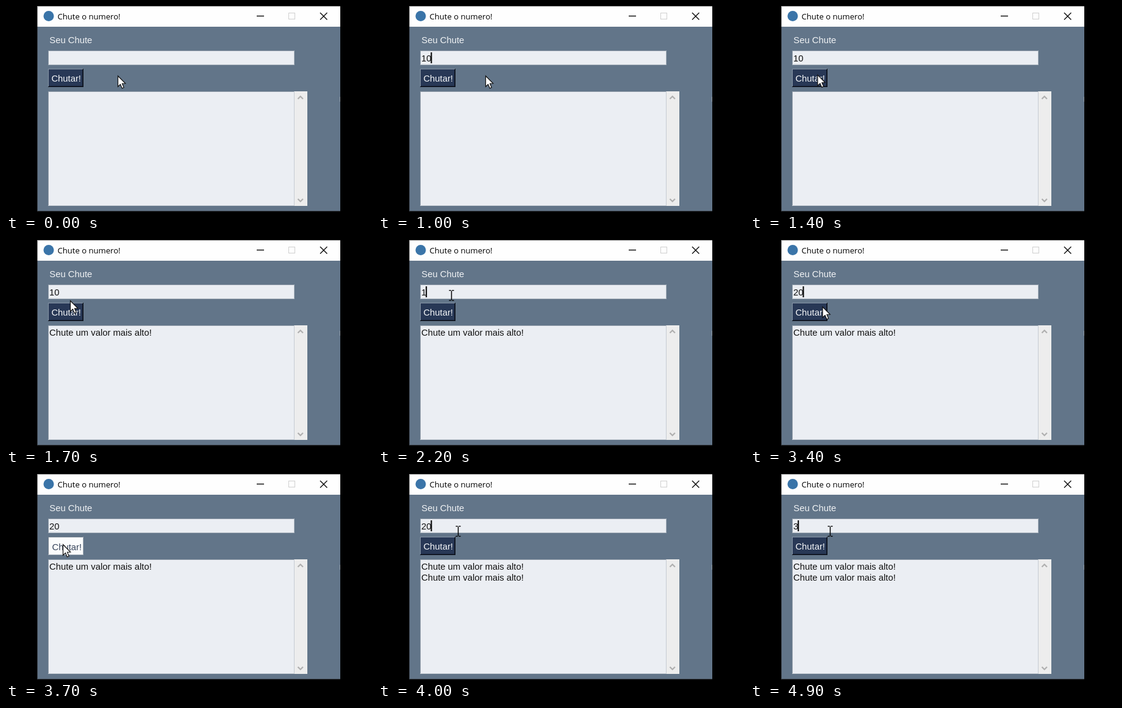
An HTML page with a canvas for the animation above (5000 ms loop, 600x338 px).

```html
<!DOCTYPE html>
<html lang="pt">
<head>
<meta charset="utf-8">
<title>Chute o numero!</title>
<style>
html, body { margin: 0; width: 100%; height: 100%; overflow: hidden; background: #000; }
canvas { display: block; }
</style>
</head>
<body>
<canvas id="stage" width="600" height="338"></canvas>
<script>
const ctx = document.getElementById('stage').getContext('2d');
const LOOP = 5000, STEP = 100;
const UI = '14.8px "Liberation Sans", Arial, sans-serif';
const TITLE = '13.1px "Open Sans", "Noto Sans", sans-serif';
const FIELD = '#ebeef3';
const HINT = 'Chute um valor mais alto!';

// time, entry text, caret visible
const entryStates = [
  [0, '', 0], [200, '', 1], [500, '1', 1], [700, '10', 1], [1300, '10', 0],
  [2100, '10', 1], [2200, '1', 1], [2400, '', 1], [2600, '2', 1], [2800, '2', 0],
  [2900, '20', 1], [3500, '20', 0], [3900, '20', 1], [4400, '2', 1],
  [4700, '', 1], [4900, '3', 1]
];
// time, x, y of the pointer's hot spot
const pointerPath = [
  [0, 183, 114], [900, 183, 114], [1000, 176, 114], [1500, 94, 112], [1600, 94, 112],
  [1700, 105, 99], [1900, 120, 90], [2800, 120, 90], [3100, 144, 101], [3200, 144, 103],
  [3600, 93, 115], [3800, 93, 115], [4000, 131, 93], [5000, 131, 93]
];
const hintTimes = [1600, 3800];

function rect(x, y, w, h, color) {
  ctx.fillStyle = color;
  ctx.fillRect(x, y, w, h);
}

function text(str, x, y, color, font = UI) {
  ctx.font = font;
  ctx.fillStyle = color;
  ctx.fillText(str, x, y);
}

function line(points, color, width) {
  ctx.beginPath();
  points.forEach(([x, y]) => ctx.lineTo(x, y));
  ctx.strokeStyle = color;
  ctx.lineWidth = width;
  ctx.stroke();
}

function bevel(x, y, w, h, fill, topLeft, bottomRight) {
  rect(x, y, w, h, bottomRight);
  rect(x, y, w - 1, h - 1, topLeft);
  rect(x + 1, y + 1, w - 2, h - 2, fill);
}

function drawWindow() {
  rect(0, 0, 600, 338, '#000');
  rect(51, 0, 497, 337, '#3c434b');
  rect(52, 34, 496, 302, '#627589');
  rect(547, 149, 1, 8, '#8d98a3');
  rect(51, 0, 497, 34, '#8a8a8a');
  rect(52, 1, 496, 33, '#fefefe');
  ctx.beginPath();
  ctx.arc(70, 16.5, 8.5, 0, 2 * Math.PI);
  ctx.fillStyle = '#3a74a8';
  ctx.fill();
  text('Chute o numero!', 84.5, 21.8, '#000', TITLE);
  line([[411, 16.5], [423, 16.5]], '#111', 1.5);
  ctx.strokeStyle = '#cfcfcf';
  ctx.lineWidth = 1;
  ctx.strokeRect(463.5, 11.5, 10, 10);
  line([[515, 11], [526.5, 22.5]], '#111', 1.5);
  line([[526.5, 11], [515, 22.5]], '#111', 1.5);
  text('Seu Chute', 71.3, 61, '#f1f3f5');
}

function drawEntry(t) {
  bevel(69, 73, 404, 24, FIELD, '#8e9aa7', '#a9b3bd');
  const [, value, caret] = entryStates.filter(s => s[0] <= t).pop();
  text(value, 71, 91, '#111');
  if (caret) rect(70 + ctx.measureText(value).width, 76, 2, 18, '#000');
}

function drawButton(pressed) {
  if (pressed) {
    bevel(69, 103, 58, 30, '#fbfcfd', '#76828f', '#aab3bd');
    text('Chutar!', 75.5, 124.7, '#37455c');
  } else {
    bevel(69, 103, 58, 30, '#283856', '#8794a6', '#0b0f18');
    rect(70, 131, 56, 1, '#141d2e');
    rect(125, 104, 1, 28, '#141d2e');
    text('Chutar!', 74.4, 124, '#f4f6f8');
  }
}

function drawOutput(t) {
  bevel(69, 140, 404, 188, FIELD, '#929da9', '#c6ccd3');
  rect(473, 140, 21, 188, '#ededed');
  line([[478.5, 152.5], [482.7, 148.3], [486.9, 152.5]], '#b0b0b0', 2.3);
  line([[478.5, 316.5], [482.7, 320.7], [486.9, 316.5]], '#b0b0b0', 2.3);
  hintTimes.forEach((start, row) => {
    if (t >= start) text(HINT, 71, 157 + row * 18, '#111');
  });
}

function pointerAt(t) {
  const i = pointerPath.findIndex(p => p[0] > t);
  const [t0, x0, y0] = pointerPath[i - 1], [t1, x1, y1] = pointerPath[i];
  const k = (t - t0) / (t1 - t0);
  return [x0 + (x1 - x0) * k, y0 + (y1 - y0) * k];
}

function drawPointer(t) {
  const [x, y] = pointerAt(t);
  ctx.save();
  ctx.translate(x, y);
  if (y > 74 && y < 97) {
    line([[0.5, -6.6], [0.5, 8.6]], '#000', 1.5);
    for (const end of [-7.3, 9.2]) {
      line([[-3.5, end], [-0.3, end]], '#000', 1.4);
      line([[1.3, end], [4.5, end]], '#000', 1.4);
    }
  } else {
    ctx.beginPath();
    [[0.5, 0.8], [0.5, 18.3], [4.5, 14.6], [7.3, 21], [10.2, 19.7], [7.5, 13.4], [12.7, 13.1]]
      .forEach(([px, py]) => ctx.lineTo(px, py));
    ctx.closePath();
    ctx.fillStyle = '#fff';
    ctx.fill();
    ctx.strokeStyle = '#111';
    ctx.lineWidth = 1.2;
    ctx.stroke();
  }
  ctx.restore();
}

function draw(t) {
  drawWindow();
  drawEntry(t);
  drawButton(t >= 3700 && t < 3800);
  drawOutput(t);
  drawPointer(t);
}

const began = performance.now();
function tick() {
  const elapsed = (performance.now() - began) % LOOP;
  draw(Math.floor(elapsed / STEP) * STEP);
  requestAnimationFrame(tick);
}
tick();
</script>
</body>
</html>
```
